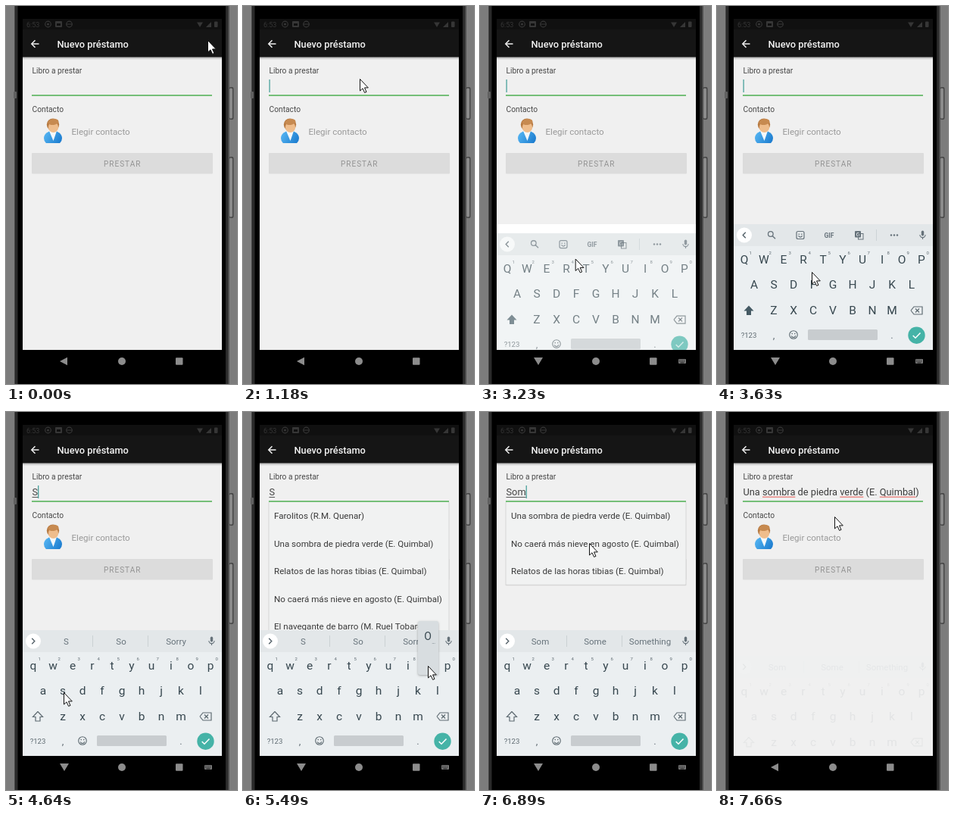
An HTML page with a canvas that plays this animation: 305x499 px, repeating every 8000 ms.

```html
<!DOCTYPE html>
<html lang="es">
<head>
<meta charset="utf-8">
<title>Nuevo préstamo</title>
<style>
  html, body { margin: 0; width: 100%; height: 100%; overflow: hidden; background: #000; }
  canvas { display: block; width: 305px; height: 499px; }
</style>
</head>
<body>
<canvas id="stage"></canvas>
<script>
const W = 305, H = 499, LOOP = 8000;
const FONT = 'Roboto, "Noto Sans", sans-serif';
const canvas = document.getElementById('stage');
const dpr = window.devicePixelRatio || 1;
canvas.width = W * dpr;
canvas.height = H * dpr;
const ctx = canvas.getContext('2d');

// Moments of the story, in ms
const FOCUS = 1180, RESIZE = 2440, KB_OPEN = 2800, KB_READY = 3500;
const LIST = 5000, PICK = 7160, KB_CLOSE = 7200, REST = 7660;
const TYPED = [[4570, 'S'], [5650, 'So'], [6420, 'Som']];
const PRESSES = [[4480, 4560, 'S', 75, 368], [5400, 5570, 'O', 244, 335], [6330, 6410, 'M', 231, 402]];
const HINTS = { S: ['S', 'So', 'Sorry'], So: ['So', 'Some', 'Sorry'], Som: ['Som', 'Some', 'Something'] };

const LAMPS = 'Farolitos (R.M. Quenar)';
const SHADE = 'Una sombra de piedra verde (E. Quimbal)';
const TALES = 'Relatos de las horas tibias (E. Quimbal)';
const SNOW = 'No caerá más nieve en agosto (E. Quimbal)';
const SAILOR = 'El navegante de barro (M. Ruel Tobares)';
const LISTS = {
  S: [LAMPS, SHADE, TALES, SNOW, SAILOR],
  So: [SHADE, SNOW, TALES, SAILOR],
  Som: [SHADE, SNOW, TALES]
};

// Pointer path: time, x, y
const PATH = [
  [0, 266, 45], [250, 266, 45], [940, 154, 99], [1050, 154, 99], [1180, 154, 96],
  [1660, 154, 96], [2500, 129, 247], [2580, 129, 247], [3460, 125, 351], [3630, 125, 351],
  [4320, 76, 370], [4700, 76, 370], [5300, 244, 335], [5580, 244, 335], [6180, 231, 397],
  [6430, 231, 397], [6890, 144, 173], [7050, 155, 138], [LOOP, 155, 138]
];

const clamp = v => Math.max(0, Math.min(1, v));
const smooth = v => v * v * (3 - 2 * v);

function rect(x, y, w, h, color, r = 0) {
  ctx.fillStyle = color;
  ctx.beginPath();
  ctx.roundRect(x, y, w, h, r);
  ctx.fill();
}

function disc(x, y, r, color) {
  ctx.fillStyle = color;
  ctx.beginPath();
  ctx.arc(x, y, r, 0, 7);
  ctx.fill();
}

function ring(x, y, r, color, width = 1) {
  ctx.strokeStyle = color;
  ctx.lineWidth = width;
  ctx.beginPath();
  ctx.arc(x, y, r, 0, 7);
  ctx.stroke();
}

function trace(points) {
  ctx.beginPath();
  for (let i = 0; i < points.length; i += 2) ctx.lineTo(points[i], points[i + 1]);
}

function line(points, color, width = 1) {
  trace(points);
  ctx.strokeStyle = color;
  ctx.lineWidth = width;
  ctx.stroke();
}

function poly(points, color) {
  trace(points);
  ctx.closePath();
  ctx.fillStyle = color;
  ctx.fill();
}

function text(str, x, y, size, color, align = 'left', weight = 400) {
  ctx.font = `${weight} ${size}px ${FONT}`;
  ctx.textAlign = align;
  ctx.fillStyle = color;
  ctx.fillText(str, x, y);
}

function drawPhone() {
  rect(0, 0, W, H, '#000');
  rect(0, 0, 11, H, '#7c7c7c');
  rect(11, 0, 1.5, H, '#4a4a4a');
  rect(12.5, 0, 3, H, '#2a2a2a');
  rect(10, 113, 4, 9, '#606060', 1);
  rect(290, 0, 3, H, '#2a2a2a');
  rect(293, 0, 1.5, H, '#4a4a4a');
  rect(294.5, 0, 11, H, '#7c7c7c');
  for (const [y, h] of [[107, 43], [199, 81]]) {
    rect(294.5, y, 6, h, '#474747', 2);
    rect(295, y + 1.5, 4, h - 3, '#8b8b8b', 1.5);
  }
}

function drawHeader() {
  rect(22, 17, 263, 50.5, '#151515');
  rect(22, 17, 263, 14, '#101010');
  text('6:53', 27, 27.5, 9, '#363636');
  ring(55.5, 24, 3.8, '#363636', 1.2);
  disc(55.5, 24, 1.6, '#363636');
  rect(65, 20, 9, 8, '#363636', 1);
  rect(67, 23, 5, 3, '#101010');
  ring(83.5, 24, 3.8, '#363636', 1.2);
  line([80, 24, 87, 24], '#363636');
  poly([252, 21.5, 260, 21.5, 256, 28], '#363636');
  poly([264, 28, 271, 28, 271, 21], '#363636');
  rect(275, 20.5, 4.5, 7.5, '#363636', 1);

  line([43.5, 50, 34, 50], '#f0f0f0', 1.5);
  line([38.5, 45.2, 33.8, 50, 38.5, 54.8], '#f0f0f0', 1.5);
  text('Nuevo préstamo', 67.5, 54.6, 12.8, '#f4f4f4', 'left', 500);
}

function drawAvatar() {
  ctx.save();
  ctx.beginPath();
  ctx.rect(49, 148, 28, 33);
  ctx.clip();
  const coat = ctx.createLinearGradient(50, 166, 74, 181);
  coat.addColorStop(0, '#58b8f4');
  coat.addColorStop(1, '#1878cc');
  ctx.fillStyle = coat;
  ctx.beginPath();
  ctx.ellipse(62, 174.5, 12, 10, 0, 0, 7);
  ctx.fill();
  poly([57, 165, 67, 165, 62.5, 178], '#f4f8fb');
  ctx.fillStyle = '#b77a42';
  ctx.beginPath();
  ctx.ellipse(62, 156.5, 8.2, 8, 0, 0, 7);
  ctx.fill();
  ctx.fillStyle = '#efbd8c';
  ctx.beginPath();
  ctx.ellipse(62.5, 160, 6.6, 7, 0, 0, 7);
  ctx.fill();
  ctx.fillStyle = '#c78a50';
  ctx.beginPath();
  ctx.ellipse(62.5, 153, 7, 4, -0.15, 0, 7);
  ctx.fill();
  ctx.restore();
}

function drawForm() {
  rect(22, 67.5, 263, 386.5, '#f0f0f0');
  const shade = ctx.createLinearGradient(0, 67, 0, 71);
  shade.addColorStop(0, 'rgba(0,0,0,.3)');
  shade.addColorStop(1, 'rgba(0,0,0,0)');
  rect(22, 67.5, 263, 3.5, shade);
  text('Libro a prestar', 34.5, 89.2, 10.24, '#484848');
  rect(34, 117.2, 238, 1.6, '#4caf50');
  text('Contacto', 34.5, 139.8, 10.24, '#484848');
  drawAvatar();
  text('Elegir contacto', 86.5, 169.7, 11.6, '#999');
  rect(34, 194, 239, 27.5, '#dcdcdc', 1);
  ctx.letterSpacing = '1px';
  text('PRESTAR', 129, 211.6, 10, '#939393');
  ctx.letterSpacing = '0px';
}

function drawField(typed, since, t) {
  if (t >= PICK) {
    text(SHADE, 34.5, 110.3, 12.8, '#3c3c3c');
    for (const word of ['sombra', 'verde', 'Quimbal']) {
      const x = 34.5 + ctx.measureText(SHADE.slice(0, SHADE.indexOf(word))).width;
      rect(x, 111.5, ctx.measureText(word).width, 1.5, '#ea8a86');
    }
    return;
  }
  text(typed, 34.5, 110.3, 12.8, '#444');
  const width = ctx.measureText(typed).width;
  if (typed) rect(34.5, 112, width, 1, '#555');
  if (t >= FOCUS && (t - since) % 1000 < 500) rect(34.5 + width, 97, 1.2, 17, '#3b9a94');
}

function drawList(items) {
  const pitch = 36.4, h = items.length * pitch;
  rect(33.5, 119, 239, h + 1, '#d6d6d6', 1);
  rect(34.5, 119, 237, h - 0.4, '#f1f2f2', 1);
  items.forEach((item, i) => text(item, 41, 141.3 + i * pitch, 11.6, '#3a3a3a'));
}

function drawNav(ime) {
  const c = '#8c8c8c';
  rect(22, 454, 263, 45, '#000');
  if (ime) {
    poly([71, 464, 83, 464, 77, 474], c);
    rect(262, 466, 10, 6, '#777', 1);
    for (const y of [467.3, 469]) {
      for (let x = 263; x < 271; x += 2) rect(x, y, 1, 0.8, '#000');
    }
    rect(264.5, 470.6, 5, 0.7, '#000');
  } else {
    poly([71, 469, 81, 463.8, 81, 474.2], c);
  }
  disc(153, 469, 5, c);
  rect(224, 464.3, 9.5, 9.5, c, 1);
}

function drawMic(x, y, c) {
  rect(x - 1.7, y - 5.5, 3.4, 7, c, 1.7);
  ctx.strokeStyle = c;
  ctx.lineWidth = 1.1;
  ctx.beginPath();
  ctx.arc(x, y, 3.6, 0, Math.PI);
  ctx.stroke();
  line([x, y + 3.6, x, y + 6], c, 1.1);
}

function drawTools(c) {
  ring(70.8, 301, 3.3, c, 1.3);
  line([73.2, 303.4, 77, 307.2], c, 1.4);
  ctx.strokeStyle = c;
  ctx.lineWidth = 1.2;
  ctx.beginPath();
  ctx.roundRect(105, 297.5, 10, 10, 2);
  ctx.stroke();
  disc(108.2, 301.2, 0.8, c);
  disc(111.8, 301.2, 0.8, c);
  ctx.beginPath();
  ctx.arc(110, 302.6, 2.4, 0.2, 2.9);
  ctx.stroke();
  text('GIF', 148, 305.6, 8.5, c, 'center', 700);
  rect(182, 297, 8, 8.5, c, 1);
  text('G', 186, 303.9, 6.5, '#e4e8ea', 'center', 700);
  ctx.lineWidth = 1;
  ctx.strokeRect(186.5, 300.5, 6.5, 7.5);
  rect(210, 295, 1, 15, '#cdd3d6');
  for (const x of [230, 234, 238]) disc(x, 302.5, 1.2, c);
}

function drawKeys(upper) {
  const ink = '#37474f', soft = '#5f6b72';
  const rows = [['qwertyuiop', 36, 335], ['asdfghjkl', 49, 368], ['zxcvbnm', 75, 402]];
  rows.forEach(([keys, x0, y], r) => [...keys].forEach((key, i) => {
    const x = x0 + i * 26;
    text(upper ? key.toUpperCase() : key, x, y + 5.2, 15.5, ink, 'center');
    if (!r) text((i + 1) % 10, x + 8.2, y - 7.3, 6, soft, 'center');
  }));

  const shift = [42, 395.5, 48.5, 402.5, 45, 402.5, 45, 408, 39, 408, 39, 402.5, 35.5, 402.5];
  if (upper) poly(shift, '#455a64');
  else line([...shift, 42, 395.5], soft, 1.2);

  line([256, 402, 260, 397, 271, 397, 271, 407, 260, 407, 256, 402], soft, 1.2);
  line([262, 399.5, 267, 404.5], soft, 1.2);
  line([267, 399.5, 262, 404.5], soft, 1.2);

  text('?123', 42, 438, 9.6, soft, 'center');
  text(',', 75, 438.5, 13, soft, 'center');
  ring(101, 434, 5.3, soft, 1.1);
  disc(99.2, 432.6, 0.8, soft);
  disc(102.8, 432.6, 0.8, soft);
  ctx.beginPath();
  ctx.arc(101, 434.6, 2.8, 0.2, 2.9);
  ctx.stroke();
  rect(120, 427, 92, 14, '#c8cccf', 1.5);
  text('.', 231, 438.5, 13, soft, 'center');
  disc(263.5, 434.7, 11.2, '#45b3a7');
  line([258.7, 435, 262, 438.2, 268.5, 431.5], '#fff', 1.5);
}

function drawKeyboard(typed, alpha, offset) {
  const soft = '#66727a';
  ctx.save();
  ctx.beginPath();
  ctx.rect(22, 67, 263, 387);
  ctx.clip();
  ctx.globalAlpha = alpha;
  ctx.translate(0, offset);
  rect(22, 288, 263, 166, '#ebeff1');
  rect(22, 288, 263, 29, '#e3e7e9');
  disc(36, 302.5, 10, '#fff');
  const d = typed ? 1.8 : -1.8;
  line([36 - d, 298.7, 36 + d, 302.5, 36 - d, 306.3], '#55626a', 1.4);
  if (typed) {
    HINTS[typed].forEach((word, i) => text(word, [79.5, 152, 224.5][i], 306.7, 11.5, soft, 'center'));
    rect(114, 295, 1, 15, '#cbd1d4');
    rect(187, 295, 1, 15, '#cbd1d4');
  } else {
    drawTools(soft);
  }
  drawMic(271.5, 302, soft);
  drawKeys(!typed);
  ctx.restore();
}

function drawPress([, , key, x, y]) {
  ctx.save();
  ctx.shadowColor = 'rgba(0,0,0,.3)';
  ctx.shadowBlur = 3 * dpr;
  ctx.shadowOffsetY = dpr;
  rect(x - 13, y - 59, 27, 71, '#d8dde0', 3);
  ctx.restore();
  text(key, x, y - 34.5, 14, '#37474f', 'center');
  if (key === 'O') text('…', x + 7.5, y - 29, 7, '#5f6b72', 'center');
}

function drawPointer(t) {
  const i = PATH.findIndex(p => p[0] > t);
  const [t0, x0, y0] = PATH[i - 1], [t1, x1, y1] = PATH[i];
  const p = smooth((t - t0) / (t1 - t0));
  ctx.save();
  ctx.translate(x0 + (x1 - x0) * p, y0 + (y1 - y0) * p);
  trace([0.5, 0.5, 0.5, 16, 4, 12.8, 6.6, 18.4, 9, 17.4, 6.5, 11.9, 11.3, 11.9]);
  ctx.closePath();
  ctx.fillStyle = '#fff';
  ctx.fill();
  ctx.strokeStyle = '#111';
  ctx.lineWidth = 1;
  ctx.stroke();
  ctx.restore();
}

function draw(t) {
  ctx.setTransform(dpr, 0, 0, dpr, 0, 0);
  let typed = '', since = FOCUS;
  for (const [time, str] of TYPED) if (t >= time) [since, typed] = [time, str];
  const ime = t >= RESIZE && t < KB_CLOSE;

  drawPhone();
  drawHeader();
  drawForm();
  drawField(typed, since, t);
  if (t >= LIST && t < PICK) drawList(LISTS[typed]);
  if (ime) rect(22, 288, 263, 166, '#fff');

  if (t >= KB_OPEN) {
    const hidden = t < KB_CLOSE
      ? 1 - smooth(clamp((t - KB_OPEN) / (KB_READY - KB_OPEN)))
      : (Math.min(t, REST) - KB_CLOSE) / 495;
    drawKeyboard(typed, 1 - hidden, 36.5 * hidden);
  }
  for (const press of PRESSES) if (t >= press[0] && t < press[1]) drawPress(press);
  drawNav(ime);
  drawPointer(t);
}

function tick(now) {
  draw((now - start) % LOOP);
  requestAnimationFrame(tick);
}

const start = performance.now();
draw(0);
requestAnimationFrame(now => tick(Math.max(now, start)));
</script>
</body>
</html>
```
